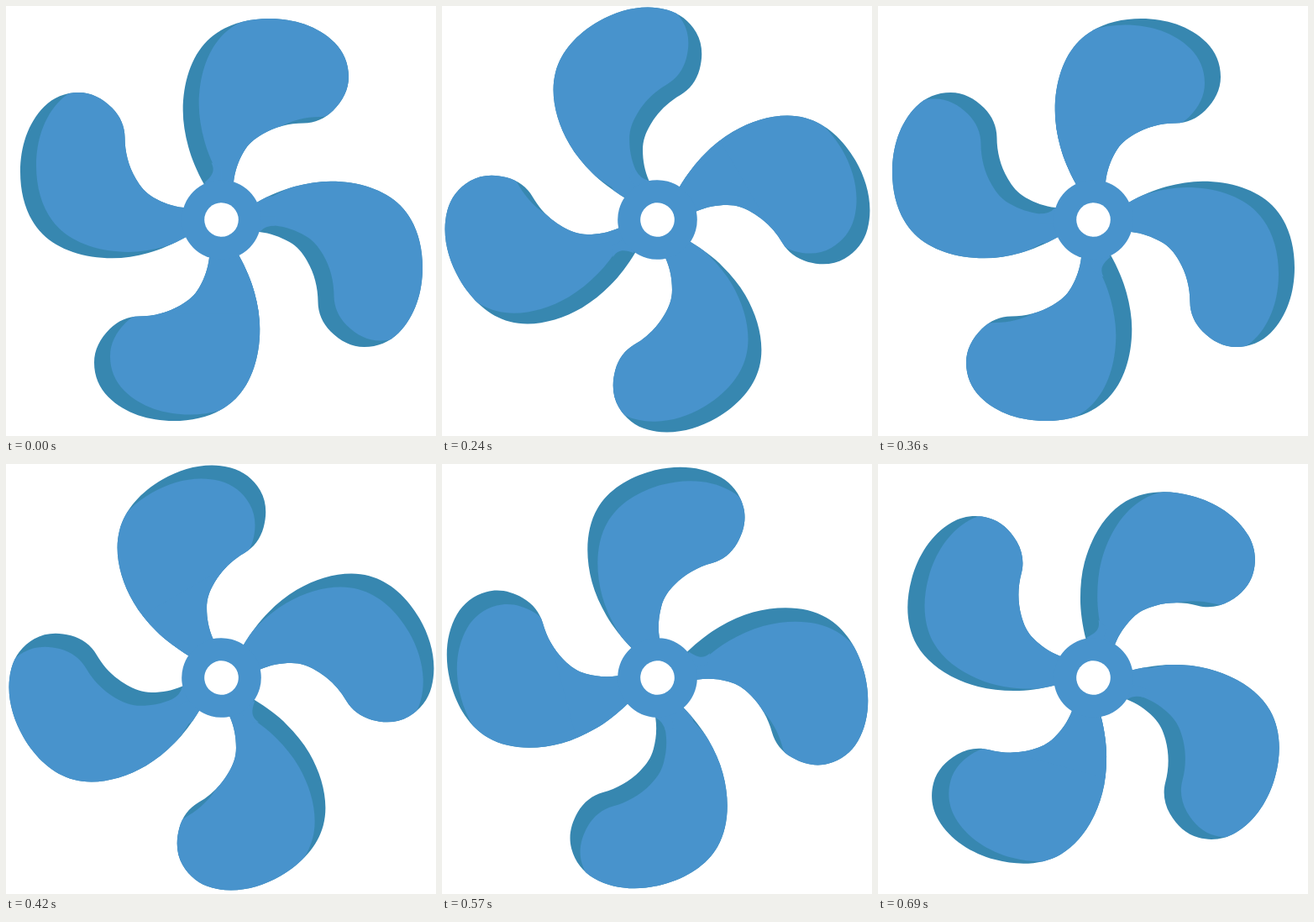
Write an HTML page that moves like this. It is 512 px wide and 512 px high and loops after 0.72 s.

```html
<!DOCTYPE html>
<html lang="en">
<head>
<meta charset="utf-8">
<title>Spinning fan</title>
<style>
html, body { margin: 0; width: 100%; height: 100%; overflow: hidden; background: #fff; }
svg { display: block; width: 100vw; height: 100vh; }
</style>
</head>
<body>
<svg viewBox="0 0 512 512">
  <defs>
    <path id="blade" d="M-20.5-42C-29-57-36-74-39.4-87C-43.3-101.5-45.8-116-45.8-130
      C-45.8-163-36-194-17-213C1-231 28-239.5 57-239.5C86-239.5 115-230.7 134.7-211
      C145.5-200.2 151.5-186 151.5-170C151.5-155 144.5-141.5 133-130
      C123.5-120.5 111-115 98-115C81-115 64-110.7 49-102C39-96.2 32-90.3 26.6-81
      C20-69.6 16-58 14.5-45L14-20L-20-20Z"/>
    <clipPath id="edge"><use href="#blade"/></clipPath>
  </defs>
  <g id="fan"></g>
</svg>
<script>
const LIGHT = '#4893cc', DARK = '#3787b0';
const CX = 256.5, CY = 254.5;
const SHIFT = '19 -7.4';          // offset of the lit face from the blade
const LOOP = 720, STEP = 30;      // ms
const fan = document.getElementById('fan');

// Lit corners near the hub, in each blade's own axes
const roots = [
  'M-12-68C-7-58-11-52-20.5-44L0-40L0-62Z',
  'M14-40L14-46Q7-52 7-64L-4-64L-4-40Z',
  'M-60-112H80V-30H-60Z',
  ''
];

function blade(root, i) {
  const turn = i * 90;
  return `<g transform="rotate(${turn})">
    <use href="#blade" fill="${DARK}"/>
    <g clip-path="url(#edge)" fill="${LIGHT}">
      <use href="#blade" transform="rotate(${-turn}) translate(${SHIFT}) rotate(${turn})"/>
      <path d="${root}"/>
    </g>
  </g>`;
}

fan.innerHTML = roots.map(blade).join('') +
  `<circle r="47.3" fill="${LIGHT}"/><circle r="20.3" fill="#fff"/>`;

function draw(ms) {
  const step = Math.floor((ms % LOOP) / STEP + 0.001);
  const angle = -360 * step * STEP / LOOP;
  fan.setAttribute('transform', `translate(${CX} ${CY}) rotate(${angle})`);
}

function tick(now) {
  draw(now);
  requestAnimationFrame(tick);
}

draw(0);
requestAnimationFrame(tick);
</script>
</body>
</html>
```
